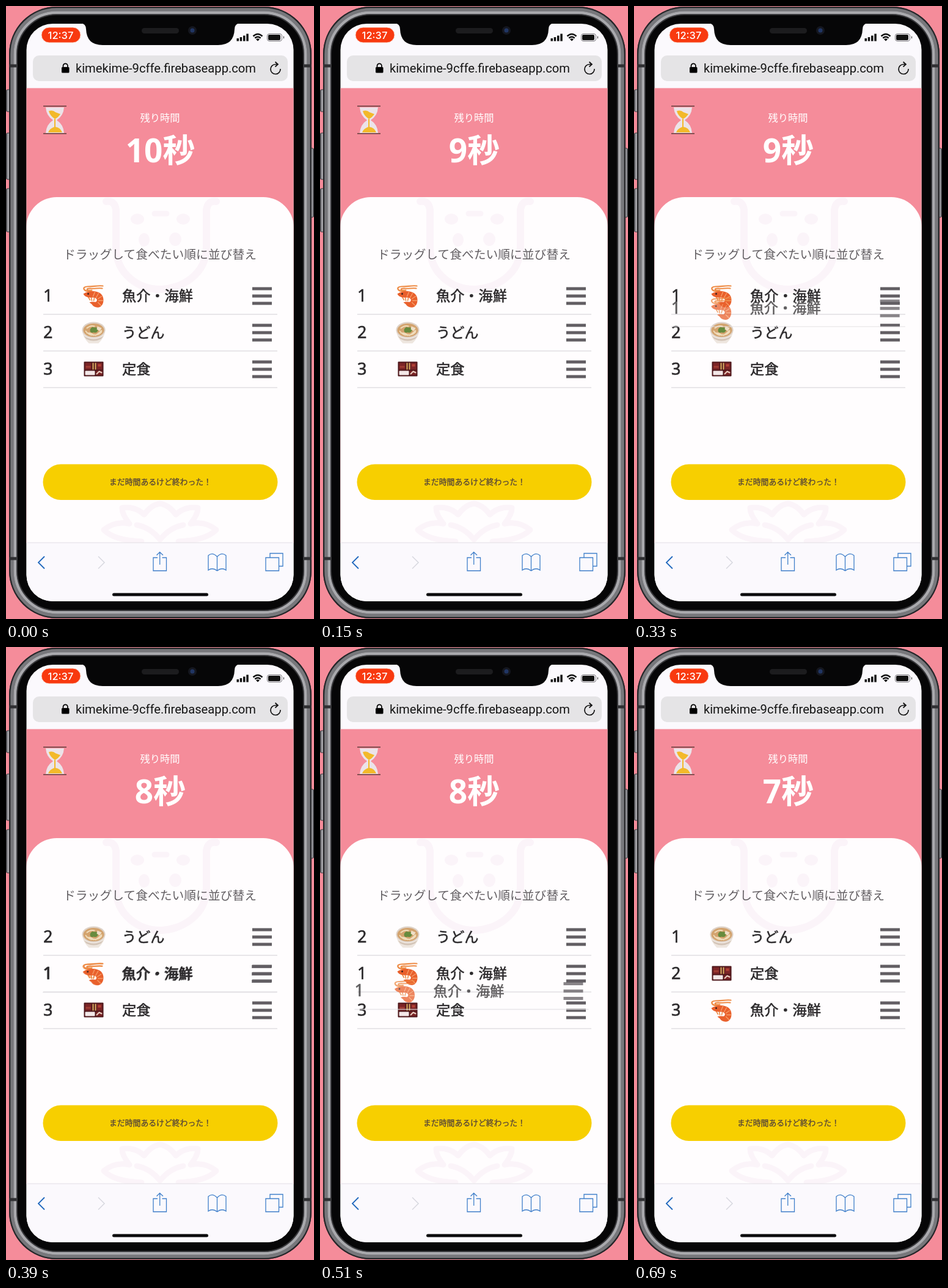
These frames come from a looping animation (504 px wide and 1004 px high, 720 ms). An HTML page:

```html
<!DOCTYPE html>
<html lang="ja">
<head>
<meta charset="utf-8">
<title>並び替え</title>
<style>
  html, body { margin: 0; width: 100%; height: 100%; overflow: hidden; background: #f58c9a; }
  svg { display: block; width: 100%; height: 100%; }
  text { font-family: "Noto Sans CJK JP", "Noto Sans CJK", sans-serif; }
  .mid { text-anchor: middle; }
  .line { fill: none; stroke-linecap: round; stroke-linejoin: round; }
  .ring { fill: none; }
  .tool { fill: none; stroke: #3f7fca; stroke-width: 1.3; }
  .count { font: 700 53px "Open Sans", "Noto Sans CJK JP", "Noto Sans CJK", sans-serif; }
  .number { font: 500 27px "Noto Sans", "Open Sans", sans-serif; }
  .medium { fill: #2c2a2c; stroke: #2c2a2c; stroke-width: .6; }
</style>
</head>
<body>
<svg viewBox="0 0 504 1004">
  <defs>
    <clipPath id="screen"><rect x="33.5" y="29" width="437" height="946" rx="43"/></clipPath>
    <linearGradient id="metal"><stop stop-color="#55555a"/><stop offset=".5" stop-color="#b5b4b9"/><stop offset="1" stop-color="#4b4b4f"/></linearGradient>

    <g id="shrimp">
      <g class="line" stroke="#ee8b45" stroke-width="2.200">
        <path d="M-3-7C-18-6-20-15-10-15C0-15 7-17 15-16M-3-9C-13-8-13-12-6-12C1-11 8-13 14-12"/>
        <path d="M-9 2l3 5M-4 3l1 5M1 4l-1 4" stroke-width="1.600"/>
      </g>
      <path d="M-17-3C-8-9 5-9 12-3C18 3 17 14 11 18C6 21-1 18-3 14L-7 11C-2 9 1 11 4 10C7 7 5 3-1 3C-8 3-14 3-17-3Z" fill="#e9602c"/>
      <path class="line" d="M2-6L-1 1M8-4L4 3M13 1L7 5M15 8L8 8M12 16L7 11" stroke="#f7a16c" stroke-width="1.300"/>
      <circle cx="-9" cy="-3" r="1.400" fill="#392020"/>
    </g>

    <g id="bowl">
      <path d="M-19-4C-18 9-10 15-8 18H8C10 15 18 9 19-4Z" fill="#eee6df"/>
      <path d="M-16 6Q0 16 16 6L12 11Q0 17-12 11Z" fill="#d4c5b8"/>
      <ellipse cy="-4" rx="19" ry="13" fill="#ded2c8"/>
      <ellipse cy="-3.500" rx="17" ry="11" fill="#d3a36e"/>
      <path class="line" d="M-13-2Q-7 6 0 4Q9 5 13-1M-11-7Q-5-12 1-10M-11 1Q-3 1 0 5M3 5Q9 1 13-3" stroke="#f0dcba" stroke-width="2"/>
      <path d="M-6-4Q-4-10 1-8Q7-9 7-3Q5 2 0 0Q-6 2-6-4Z" fill="#678b3e"/>
      <path d="M6-10l7 3-3 5-5-3Z" fill="#efdfc7"/>
    </g>

    <g id="bento">
      <rect x="-16" y="-12" width="32" height="24" rx="1" fill="#4d171b"/>
      <path d="M-14-10H-4V1H-14ZM5-10H14V1H5ZM4 3H14V10H4Z" fill="#7c2426"/>
      <rect x="-14" y="3" width="16" height="7" rx="1" fill="#f3e8e8"/>
      <path d="M-2-10h2V1h-2zM2-10h2V1h-2z" fill="#e0b062"/>
      <path d="M-13-5h8v3h-8z" fill="#9f3c32"/>
      <path d="M7-8h5v4H7z" fill="#b34034"/>
      <path d="M5 8l4-4 4 2" class="line" stroke="#e9cfc2" stroke-width="2"/>
    </g>
  </defs>

  <rect width="504" height="1004" fill="#f58c9a"/>

  <!-- phone body -->
  <g fill="url(#metal)" stroke="#38383b">
    <rect x=".5" y="137" width="7" height="36" rx="2"/>
    <rect x=".5" y="208" width="7" height="76" rx="2"/>
    <rect x=".5" y="299" width="7" height="71" rx="2"/>
    <rect x="497" y="233" width="6.500" height="113" rx="2"/>
  </g>
  <rect x="5" y="1" width="495" height="1002" rx="78" fill="#454548"/>
  <rect class="ring" x="6" y="2" width="493" height="1000" rx="77" stroke="#252528" stroke-width="2"/>
  <rect class="ring" x="10" y="6" width="485" height="992" rx="73" stroke="#77777b" stroke-width="5"/>
  <rect class="ring" x="15" y="11" width="475" height="982" rx="68" stroke="#a9a9ad" stroke-width="5"/>
  <rect x="18" y="14" width="469" height="976" rx="65" fill="#060607" stroke="#38383b" stroke-width="2"/>
  <path d="M5 98h12M5 905h12M488 98h12M488 905h12" stroke="#303033" stroke-width="5"/>

  <g clip-path="url(#screen)">
    <rect x="33" y="29" width="438" height="946" fill="#fbf9fd"/>
    <rect x="33" y="134.500" width="438" height="745" fill="#f58c9a"/>
    <path d="M33 879V363A50 50 0 0 1 83 313H421A50 50 0 0 1 471 363V879Z" fill="#fffdfe"/>

    <!-- faint backdrop -->
    <g class="line" stroke="#fbf4f9" stroke-width="12">
      <path d="M164 320Q178 318 180 334V395C180 440 218 464 252 464S328 440 328 395V334Q330 318 344 320"/>
      <path d="M243 340h20" stroke-width="9"/>
      <path d="M222 877C190 876 170 868 160 858C174 846 188 845 202 848C194 838 190 829 190 822C204 819 218 825 226 833C234 822 243 816 252 815C261 816 270 822 278 833C286 825 300 819 314 822C314 829 310 838 302 848C316 845 330 846 344 858C334 868 314 876 282 877M214 850Q236 854 252 874Q268 854 290 850" stroke-width="9"/>
      <g fill="#fbf4f9" stroke="none">
        <ellipse cx="215" cy="349" rx="11" ry="9"/><ellipse cx="290" cy="349" rx="11" ry="9"/>
        <ellipse cx="226" cy="383" rx="9" ry="11"/><ellipse cx="277" cy="382" rx="10" ry="11"/>
      </g>
    </g>

    <!-- status bar and address -->
    <rect x="58" y="35" width="64" height="25" rx="12.500" fill="#f8390f" stroke="#fbd5cb"/>
    <text class="mid" x="89.500" y="53.500" fill="#fff" style="font:500 16.5px Inter,sans-serif">12:37</text>
    <g fill="#111">
      <path d="M377.500 53h3.500v4.500h-3.500zM382.700 51h3.500v6.500h-3.500zM388 48.500h3.500v9h-3.500zM393.300 45.500h3.500v12h-3.500z"/>
      <rect x="429" y="47" width="20" height="9" rx="2"/>
      <path d="M454 49q2 2 0 5z"/>
    </g>
    <rect x="427.500" y="45.500" width="24" height="12" rx="3.500" fill="none" stroke="#77757a"/>
    <path d="M404.500 49.500Q412 42.500 419.500 49.500M407.300 52.600Q412 48.500 416.700 52.600" fill="none" stroke="#111" stroke-width="2.500"/>
    <path d="M409 54.500Q412 52 415 54.500L412 57.500Z" fill="#111"/>
    <rect x="44" y="81" width="417" height="42" rx="10" fill="#e5e4e6"/>
    <rect x="91" y="100" width="12.500" height="9.500" rx="1.500"/>
    <path d="M93.500 101V98a3.700 3.700 0 0 1 7.400 0V101" fill="none" stroke="#000" stroke-width="1.700"/>
    <text class="mid" x="261.500" y="109" fill="#151515" style="font:400 20.2px Roboto,sans-serif">kimekime-9cffe.firebaseapp.com</text>
    <path d="M449 103A8 8 0 1 1 441 95.500H444M440.500 91.500L445 95.500L440.500 99.500" fill="none" stroke="#111" stroke-width="1.700"/>

    <!-- countdown -->
    <path d="M65 166H95Q94 180 83 187Q94 194 95 208H65Q66 194 77 187Q66 180 65 166Z" fill="#ece3e8"/>
    <path d="M70 172Q77 170 81 174L89 177Q86 182 80 185Q72 180 70 172ZM79 185h2v13q8 1 11 9H69q2-6 10-9Z" fill="#f3b92a"/>
    <path d="M61 164H99M61 209H99" stroke="#855052" stroke-width="2.200"/>
    <text class="mid" x="252" y="189" font-size="16.300" fill="#fff">残り時間</text>
    <text class="mid count" id="count" x="252.500" y="256" fill="#fff"></text>

    <text class="mid" x="252" y="414" font-size="19.800" font-weight="300" fill="#625e62">ドラッグして食べたい順に並び替え</text>
    <g id="list"></g>
    <rect x="60.500" y="750.500" width="384" height="58.500" rx="29.200" fill="#f7cf00"/>
    <text class="mid" x="252.500" y="784" font-size="12.850" font-weight="500" fill="#574638" stroke="#574638" stroke-width=".3">まだ時間あるけど終わった！</text>

    <!-- toolbar -->
    <rect x="33" y="879" width="438" height="96" fill="#fbf9fd"/>
    <path d="M33 879H471" stroke="#e2dee4"/>
    <path class="tool" d="M63 901.500L53 911.500L63 921.500" style="stroke:#2168bd;stroke-width:1.800"/>
    <path class="tool" d="M151 901.500L161 911.500L151 921.500" style="stroke:#d9dae0;stroke-width:1.600"/>
    <path class="tool" d="M248 903.500H241V925H262.500V903.500H255.500M251.700 915V894.500M246.500 899.500L251.700 894.500L257 899.500"/>
    <path class="tool" d="M345.500 902Q338 894 331 900V924Q338 919 345.500 925Q353 919 360 924V900Q353 894 345.500 902V925"/>
    <path class="tool" d="M425 903.500H446.500V925H425ZM432 903V896.500H453V917.500H447"/>
    <rect x="174" y="961.500" width="157" height="5" rx="2.500" fill="#0b0b0c"/>
  </g>

  <!-- notch -->
  <path d="M122 28Q131 29 131 38Q132 64 158 64H347Q373 64 374 38Q374 29 383 28Z" fill="#060607"/>
  <rect x="222" y="36" width="61" height="9" rx="4.500" fill="#1c1c1e"/>
  <circle cx="305" cy="40" r="7" fill="#15171f"/>
  <circle cx="305" cy="40" r="3.500" fill="#203563"/>
</svg>

<script>
const LOOP = 720, STEP = 30;
const ROW_TOP = 474.5, ROW_HEIGHT = 60;
const DRAG_START = 300, SWAP_FIRST = 360, SWAP_SECOND = 540, DROP = 630;
const items = [['shrimp', '魚介・海鮮'], ['bowl', 'うどん'], ['bento', '定食']];
// time, x offset, y of the dragged row
const dragPath = [[300, 0, 474.5], [390, -1, 535], [510, -4.5, 563], [570, -4, 595], [630, -1, 595]];

const rowMarkup = ([icon, label], i) => `<g>
  <text class="number medium" x="61" y="9.200">${i + 1}</text>
  <use href="#${icon}" x="143.500"/>
  <text class="medium" x="190" y="8.500" font-size="23.200" font-weight="500">${label}</text>
  <path d="M403-11.500h32M403 .5h32M403 12.500h32" stroke="#625e63" stroke-width="5"/>
  <path d="M61 30.500H444" stroke="#e1dfe2" stroke-width="1.300"/>
</g>`;

const list = document.getElementById('list');
const count = document.getElementById('count');
list.innerHTML = items.map(rowMarkup).join('') + rowMarkup(items[0], 0);
const rows = [...list.children];
const ghost = rows.pop();
ghost.setAttribute('opacity', '.75');

const place = (el, x, y) => el.setAttribute('transform', `translate(${x} ${y})`);

function dragPoint(t) {
  const next = dragPath.findIndex(p => p[0] > t);
  const a = dragPath[next - 1], b = dragPath[next];
  const k = (t - a[0]) / (b[0] - a[0]);
  return [1, 2].map(i => a[i] + (b[i] - a[i]) * k);
}

function draw(t) {
  count.textContent = (t < 90 ? 10 : t < 360 ? 9 : t < 630 ? 8 : 7) + '秒';

  const order = t < SWAP_FIRST ? [0, 1, 2] : t < SWAP_SECOND ? [1, 0, 2] : [1, 2, 0];
  order.forEach((item, slot) => {
    place(rows[item], 0, ROW_TOP + slot * ROW_HEIGHT);
    rows[item].firstElementChild.textContent = (t < DROP ? item : slot) + 1;
  });

  const dragging = t >= DRAG_START && t < DROP;
  ghost.style.display = dragging ? '' : 'none';
  if (dragging) place(ghost, ...dragPoint(t));
}

function tick() {
  draw(Math.floor(performance.now() % LOOP / STEP) * STEP);
  requestAnimationFrame(tick);
}
tick();
</script>
</body>
</html>
```
